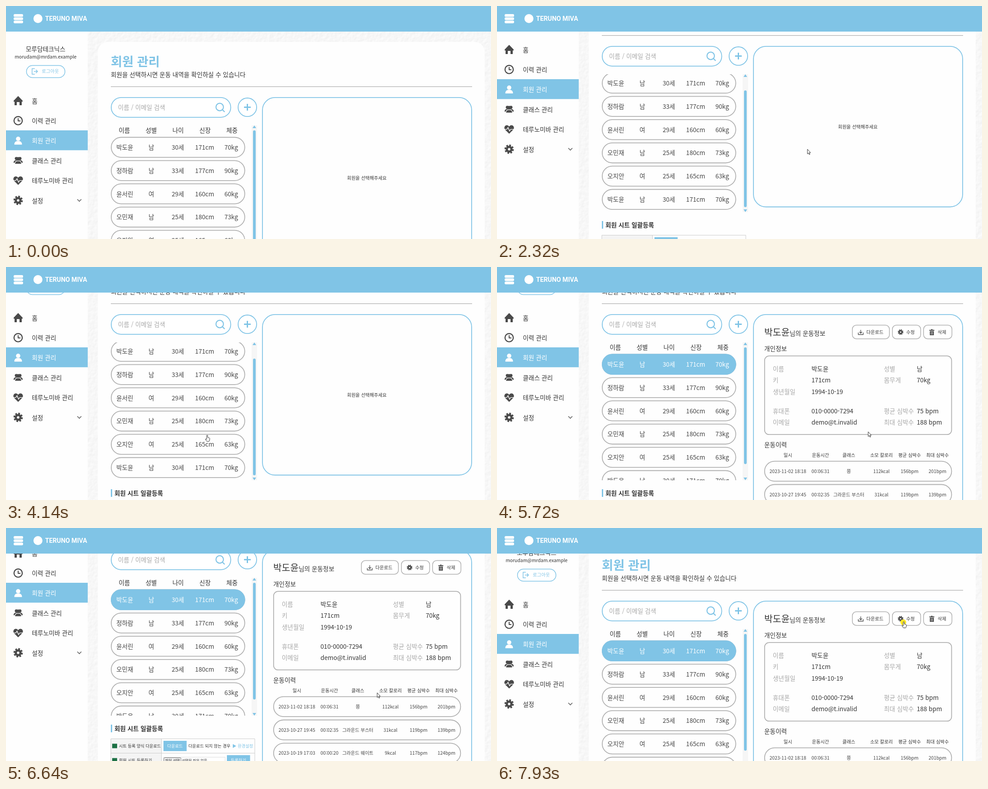
Recreate the animation shown at these times as an HTML page. Size 1078x519 px, loop 8000 ms.

```html
<!DOCTYPE html>
<html lang="ko">
<head>
<meta charset="utf-8">
<title>회원 관리</title>
<style>
  html, body { margin: 0; width: 100%; height: 100%; overflow: hidden; background: #fff; }
  svg { display: block; width: 1078px; height: 519px; }
  text { font-family: "Noto Sans CJK KR", "Noto Sans CJK", "Noto Sans", sans-serif; white-space: pre; }
</style>
</head>
<body>
<svg id="stage" viewBox="0 0 1078 519"></svg>
<script>
const LOOP = 8000;
const BLUE = '#80c4e6', INK = '#333', ICON = '#4a4a4a', GREY = '#b0b0b0', PALE = '#a8a8a8';
const BASE = 13.67, SMALL = 10.3, TINY = 9.3, ROW_STEP = 51.8;

// y is the vertical middle of the line
const text = (x, y, s, { size = BASE, fill = INK, anchor = 'start', weight = 400 } = {}) =>
  `<text x="${x}" y="${y + size * .37}" font-size="${size}" fill="${fill}" text-anchor="${anchor}" font-weight="${weight}">${s}</text>`;
const mid = (x, y, s, style) => text(x, y, s, { anchor: 'middle', ...style });
const box = (x, y, w, h, r, fill, stroke = 'none', width = 1.8) =>
  `<rect x="${x}" y="${y}" width="${w}" height="${h}" rx="${r}" fill="${fill}" stroke="${stroke}" stroke-width="${width}"/>`;
const disc = (x, y, r, fill, stroke = 'none', width = 2) =>
  `<circle cx="${x}" cy="${y}" r="${r}" fill="${fill}" stroke="${stroke}" stroke-width="${width}"/>`;
const line = (d, stroke, width = 1) =>
  `<path d="${d}" fill="none" stroke="${stroke}" stroke-width="${width}"/>`;
const shape = (d, fill) => `<path d="${d}" fill="${fill}"/>`;
const at = (x, y, body, scale = 1) => `<g transform="translate(${x} ${y}) scale(${scale})">${body}</g>`;
const group = (id, body) => `<g id="${id}">${body}</g>`;

const person = fill => disc(0, -4, 4.8, fill) + shape('M-8.5 9 Q-8.5 2 -2.5 1 H2.5 Q8.5 2 8.5 9Z', fill);
const gear = disc(0, 0, 5.2, 'none', ICON, 5) +
  `<circle r="8.4" fill="none" stroke="${ICON}" stroke-width="4" stroke-dasharray="3.7 2.897"/>`;
const icons = {
  home: shape('M-10 0 L0 -10.5 L10 0 V2 H8 V10 H3 V3 H-3 V10 H-8 V2 H-10Z', ICON),
  clock: disc(0, 0, 9.2, 'none', ICON, 2.4) + line('M0 -5.5 V.5 H5', ICON, 2),
  person: person('#fff'),
  people: at(-4, -1.5, person(ICON), .72) + at(4, -1.5, person(ICON), .72) +
    `<g stroke="#fff" stroke-width="1.4">${at(0, 0, person(ICON), .88)}</g>`,
  heart: shape('M0 10 L-9 1 C-13 -4 -9 -9 -5 -9 Q-2 -9 0 -6 Q2 -9 5 -9 C9 -9 13 -4 9 1Z', ICON) +
    line('M-11 0 H-5 L-2.5 -4 L1 4 L3.5 0 H11', '#fff', 1.4),
  gear,
};

function sidebar() {
  const menu = [['home', '홈'], ['clock', '이력 관리'], ['person', '회원 관리'],
    ['people', '클래스 관리'], ['heart', '테루노미바 관리'], ['gear', '설정']];
  return box(0, 57, 181.7, 1000, 0, '#fefefe') +
    mid(88, 96, '모루담테크닉스', { weight: 500 }) +
    mid(88, 113.5, 'morudam@mrdam.example', { size: 10.4 }) +
    box(45.5, 132.5, 85.5, 27, 13.5, '#fff', BLUE, 1.5) +
    line('M64 139.5 H58 V152 H64 M62 145.7 H70 M66.5 142 L70 145.7 L66.5 149.4', BLUE, 1.5) +
    text(79.5, 145.5, '로그아웃', { size: SMALL, fill: BLUE }) +
    box(0, 277, 181.7, 44.3, 0, BLUE) +
    menu.map(([icon, label], i) => {
      const y = 211 + i * 44.4;
      return at(27, y, icons[icon]) + text(57.5, y + .5, label, { fill: i === 2 ? '#fff' : INK });
    }).join('') +
    line('M158.5 430.5 L163 435 L167.5 430.5', '#666', 1.7);
}

const columns = [264, 323, 382, 441.5, 500.5];
const members = [
  ['박도윤', '남', '30세', '171cm', '70kg'], ['정하람', '남', '33세', '177cm', '90kg'],
  ['윤서린', '여', '29세', '160cm', '60kg'], ['오민재', '남', '25세', '180cm', '73kg'],
  ['오지안', '여', '25세', '165cm', '63kg'], ['박도윤', '남', '30세', '171cm', '70kg']];

function memberRow(cells, i, selected) {
  const y = 315 + i * ROW_STEP;
  return box(233.9, y - 22.5, 296.8, 44.6, 22.3, selected ? BLUE : '#fefefe', selected ? BLUE : GREY) +
    cells.map((s, c) => mid(columns[c], y, s, { fill: selected ? '#fff' : '#444' })).join('');
}

function memberList() {
  const heads = ['이름', '성별', '나이', '신장', '체중'];
  return box(233.9, 203.9, 265.6, 44, 22, '#fff', BLUE) +
    text(249, 226, '이름 / 이메일 검색', { fill: PALE }) +
    disc(475, 225, 8.3, 'none', BLUE, 2.2) + line('M481 231 L486 236', BLUE, 2.4) +
    disc(536.5, 225.6, 20.6, '#fff', BLUE, 1.8) + line('M529 225.6 H544 M536.5 218 V233', BLUE, 3) +
    `<g clip-path="url(#listClip)">` + group('list',
      heads.map((s, c) => mid(c * 59.8 + 263, 276.5, s, { weight: 500 })).join('') +
      members.map((m, i) => memberRow(m, i)).join('') +
      group('selectedRow', memberRow(members[0], 0, true))) + '</g>' +
    box(546, 266, 12, 307, 0, '#f6f6f6') +
    shape('M548 272 L552 266 L556 272Z M548 567 L552 573 L556 567Z', BLUE) +
    group('thumb', box(549, 277, 6, 260, 3, BLUE));
}

function sheetTable() {
  const small = { size: TINY };
  const button = (x, y, s) => box(x, y, 51.5, 23, 0, BLUE) + mid(x + 25.7, y + 11.5, s, { size: TINY, fill: '#fff' });
  return box(233, 593, 3, 17, 0, BLUE) + text(241, 601.5, '회원 시트 일괄등록', { weight: 700 }) +
    box(233, 624.5, 112, 63.5, 0, '#f4f4f4') +
    line('M233 624.5 H553 V688 H233Z M345.5 624.5 V688 M233 656.5 H553', '#ccc') +
    box(236, 635.5, 11, 10, 0, '#1d7145') + text(251, 641, '시트 등록 양식 다운로드', small) +
    button(350, 629, '다운로드') + text(405.5, 641, '다운로드 되지 않는 경우', small) +
    text(503, 641, '▶ 환경설정', { size: TINY, fill: BLUE, weight: 500 }) +
    box(236, 667.5, 11, 10, 0, '#1d7145') + text(251, 673, '회원 시트 등록하기', small) +
    box(350, 665.5, 137, 15, 0, '#fff', '#ddd', 1) + box(351, 666.5, 38, 13, 2, '#efefef', '#777', 1) +
    mid(370, 673, '파일 선택', { size: 8.2 }) + text(391, 673, '선택된 파일 없음', { size: 8 }) +
    button(491, 661, '등록하기');
}

function details() {
  const medium = { weight: 500 };
  const fields = [
    [613, 699, 324.5, '이름', members[0][0]], [613, 699, 350, '키', '171cm'],
    [613, 699, 376, '생년월일', '1994-10-19'], [613, 699, 418.5, '휴대폰', '010-0000-7294'],
    [613, 699, 444, '이메일', 'demo@t.invalid'], [860, 933, 324.5, '성별', '남'],
    [860, 933, 350, '몸무게', '70kg'], [860, 933, 418.5, '평균 심박수', '75 bpm'],
    [860, 933, 444, '최대 심박수', '188 bpm']];
  const centers = [646.5, 719, 782, 854.5, 917, 979];
  const heads = ['일시', '운동시간', '클래스', '소모 칼로리', '평균 심박수', '최대 심박수'];
  const history = [
    ['2023-11-02 18:18', '00:06:31', '쯩', '112kcal', '156bpm', '201bpm'],
    ['2023-10-27 19:45', '00:02:35', '그라운드 부스터', '31kcal', '119bpm', '139bpm'],
    ['2023-10-19 17:03', '00:00:20', '그라운드 웨이트', '9kcal', '117bpm', '124bpm'],
    ['2023-10-19 16:48', '00:01:12', '그라운드 웨이트', '14kcal', '115bpm', '128bpm']];
  const button = (x, w, labelX, s) => box(x, 227.5, w, 30.5, 9, '#fff', GREY, 1.5) +
    mid(labelX, 243.5, s, { size: SMALL, weight: 500 });
  return box(570, 203.9, 465, 760, 28, '#fefefe', BLUE) +
    text(594, 243.5, members[0][0], { size: 20.5, weight: 500 }) + text(650.5, 246, '님의 운동정보', medium) +
    button(789.8, 82.4, 840, '다운로드') + button(878.8, 62.8, 919, '수정') + button(948.2, 63, 989, '삭제') +
    line('M803 244 V248.5 H814 V244 M808.5 238 V245 M805.5 242.5 L808.5 245.5 L811.5 242.5', ICON, 1.3) +
    at(897, 243, gear, .6) +
    shape('M961 238 H965 V236.5 H968 V238 H972 V240 H961Z M962 241 H971 V250 H962Z', ICON) +
    line('M965 242.5 V248.5 M968 242.5 V248.5', '#fff', 1) +
    text(594, 280, '개인정보', medium) + box(594.8, 296.2, 415.6, 175, 10, '#fefefe', GREY) +
    fields.map(([x, valueX, y, label, value]) =>
      text(x, y, label, { fill: PALE }) + text(valueX, y, value, medium)).join('') +
    text(594, 494, '운동이력', medium) +
    heads.map((s, c) => mid(centers[c], 517, s, { size: SMALL, weight: 500 })).join('') +
    history.map((cells, i) => {
      const y = 553 + i * ROW_STEP;
      return box(594.8, y - 22.3, 415.6, 44.4, 22.2, '#fefefe', GREY) +
        cells.map((s, c) => mid(centers[c], y, s, { size: SMALL, fill: '#444' })).join('');
    }).join('');
}

const emptyPanel = box(570, 203.9, 465, 357.6, 28, '#fefefe', BLUE) +
  mid(802, 383, '회원을 선택해주세요', { size: SMALL });

const header = box(0, 0, 1078, 57, 0, BLUE) +
  [18, 25.2, 32.4].map(y => box(17, y, 21, 6, 2.6, '#fff')).join('') +
  disc(71, 28, 10, '#fff') +
  `<text x="87" y="33" font-size="14.2" font-weight="700" fill="#fff" style="font-family:Roboto,sans-serif">TERUNO MIVA</text>`;

const pointerStyle = 'fill="#fff" stroke="#333" stroke-width="1" stroke-linejoin="round"';
const cursor = group('click', disc(-1, 1, 6.5, '#fbe72a')) +
  `<path id="arrow" d="M0 0 V10.5 L2.4 8.4 L4 12 L5.6 11.3 L4 7.8 H7Z" ${pointerStyle}/>` +
  `<path id="hand" d="M-1 1 a1.2 1.2 0 0 1 2.4 0 v4 l3.4 .8 q1.4 .5 1.2 2 l-.6 3.5 q-.3 1.5 -1 2.2 h-5 l-3.2 -4.3 q-.3 -1.4 1.4 -1 l1.4 1.2z" ${pointerStyle}/>`;

document.getElementById('stage').innerHTML = `
  <defs>
    <clipPath id="listClip"><rect x="232" y="266" width="302" height="307"/></clipPath>
    <filter id="paper" x="0" y="0" width="1" height="1" color-interpolation-filters="sRGB">
      <feTurbulence type="fractalNoise" baseFrequency=".12" numOctaves="2" seed="4"/>
      <feDiffuseLighting surfaceScale=".15" diffuseConstant="1.155" lighting-color="#f7f7f7">
        <feDistantLight azimuth="225" elevation="60"/>
      </feDiffuseLighting>
    </filter>
  </defs>` +
  group('page',
    `<rect x="181" y="57" width="897" height="760" filter="url(#paper)"/>` + sidebar() +
    `<rect id="card" x="204" y="80" width="860" rx="22" fill="#fefefe"/>` +
    text(233, 124, '회원 관리', { size: 27.5, fill: BLUE, weight: 700 }) +
    text(233, 153, '회원을 선택하시면 운동 내역을 확인하실 수 있습니다') +
    line('M233 179.7 H1036', '#999') +
    memberList() + sheetTable() + group('empty', emptyPanel) + group('details', details())) +
  header + group('cursor', cursor);

const $ = id => document.getElementById(id);
const show = (id, on) => $(id).setAttribute('display', on ? 'inline' : 'none');
const move = (id, x, y) => $(id).setAttribute('transform', `translate(${x} ${y})`);

// Wheel notches jump: [time, offset]
const pageScroll = [[0, 0], [690, 57], [820, 114], [2450, 171], [2520, 212], [3460, 155], [3590, 98],
  [5980, 155], [6110, 212], [6640, 155], [6710, 98], [7040, 41]];
const listScroll = [[0, 0], [1650, 29], [4350, 0]];
// Pointer path: [time, x, y]
const pointer = [[260, 1000, 512], [600, 787, 364], [1160, 787, 364], [1230, 767, 354], [1580, 452, 306],
  [2110, 452, 306], [2320, 690, 319], [3790, 690, 319], [4140, 447, 375], [4350, 440, 340], [4620, 420, 212],
  [5310, 420, 212], [5720, 825, 367], [7380, 825, 367], [7800, 904, 209], [8000, 904, 209]];

const held = (keys, t) => keys.findLast(k => k[0] <= t)[1];

function along(keys, t) {
  const i = Math.max(1, keys.findIndex(k => k[0] > t));
  const [t0, x0, y0] = keys[i - 1], [t1, x1, y1] = keys[i];
  const p = Math.min(1, Math.max(0, (t - t0) / (t1 - t0)));
  return [x0 + (x1 - x0) * p, y0 + (y1 - y0) * p];
}

function draw(now) {
  const t = now % LOOP;
  const selected = t >= 4820;
  const offset = held(listScroll, t);
  const [x, y] = along(pointer, t);
  const overButton = x < 531 || (x > 878 && y < 217);

  move('page', 0, -held(pageScroll, t));
  move('list', 0, -offset);
  move('thumb', 0, offset * 25 / 29);
  move('cursor', x, y);
  $('card').setAttribute('height', selected ? 920 : 632);
  show('selectedRow', selected);
  show('details', selected);
  show('empty', !selected);
  show('cursor', t >= 260);
  show('hand', overButton);
  show('arrow', !overButton);
  show('click', (t >= 4690 && t < 5050) || t >= 7860);
  requestAnimationFrame(draw);
}
requestAnimationFrame(draw);
</script>
</body>
</html>
```
